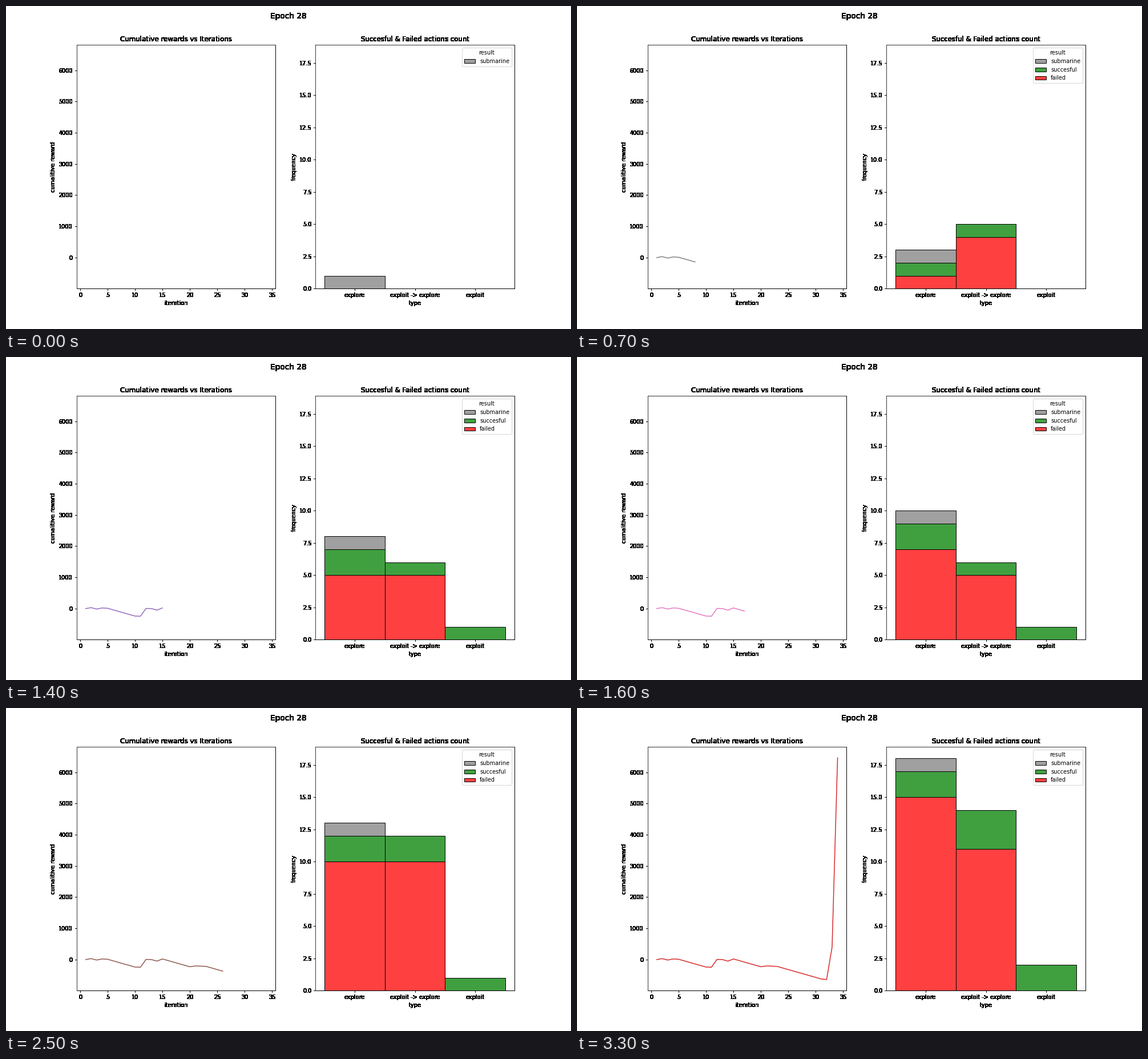
Write a matplotlib script that moves like this. It is 990 by 566 pixels and loops after 3.4 s.

```python
import matplotlib.pyplot as plt
import numpy as np
from matplotlib.animation import FuncAnimation
from matplotlib.colors import to_rgba
from matplotlib.patches import Patch

plt.rcParams["font.family"] = "DejaVu Sans"
W, H = 990, 566
DPI = W / 14
EPS = 1e-6  # guards the pixel size against float truncation

TYPES = ["explore", "exploit -> explore", "exploit"]
RESULTS = ["submarine", "succesful", "failed"]
COLORS = [to_rgba(c, 0.75) for c in ("gray", "green", "red")]

# Reward and action type (index into TYPES) of each iteration
gains = np.array([0, 30, -45, 35, -10] + [-50] * 5
                 + [-5, 250, -5, -50, 70] + [-50] * 5
                 + [25, -5, -10] + [-50] * 8 + [-20, 1040, 6065])
kinds = np.array([int(k) for k in "0001111110000020001110111000100012"])
outcomes = np.where(gains > 0, 1, 2)
outcomes[0] = 0
totals = np.cumsum(gains)
steps = np.arange(1, len(gains) + 1)


def solid(img, dpi):
    """Turn every touched pixel fully black."""
    out = np.zeros_like(img)
    out[..., 3] = img[..., 3] > 0
    return out, 0, 0


fig, (left, right) = plt.subplots(
    1, 2, figsize=((W + EPS) / DPI, (H + EPS) / DPI), dpi=DPI)
fig.subplots_adjust(left=0.125, right=0.9, bottom=0.125, top=0.88,
                    wspace=0.2005)
heading = fig.suptitle("Epoch 28", fontsize=14)

left.set(title="Cumulative rewards vs Iterations", xlabel="iteration",
         ylabel="cumalitive reward", xlim=(-0.65, 35.65), ylim=(-995, 6820),
         xticks=range(0, 36, 5), yticks=range(0, 6001, 1000))
right.set(title="Succesful & Failed actions count", xlabel="type",
          ylabel="frequency", xlim=(-0.65, 2.65), ylim=(0, 18.9),
          yticks=np.arange(0, 17.6, 2.5))
right.set_xticks(range(3), TYPES)

# Text and lines outside the plot area have hard edges
heading.set_agg_filter(solid)
for ax in (left, right):
    for part in (ax.title, ax.xaxis, ax.yaxis,
                 ax.spines["right"], ax.spines["bottom"]):
        part.set_agg_filter(solid)

line, = left.plot([], [], lw=1.5)
bars = [right.bar(range(3), 0, width=1, color=c, edgecolor="black", lw=1)
        for c in COLORS]
keys = [Patch(facecolor=c, edgecolor="black", lw=1, label=name)
        for c, name in zip(COLORS, RESULTS)]


def update(i):
    n = i + 1
    line.set_data(steps[:n], totals[:n])
    line.set_color(f"C{i % 10}")

    base = np.zeros(3)
    for r in reversed(range(3)):
        counts = np.bincount(kinds[:n][outcomes[:n] == r], minlength=3)
        for bar, y, h in zip(bars[r], base, counts):
            bar.set(y=y, height=h, visible=h > 0)
        base += counts

    shown = [keys[r] for r in range(3) if r in outcomes[:n]]
    right.legend(handles=shown, title="result", loc="upper right")


anim = FuncAnimation(fig, update, frames=len(gains), interval=100,
                     init_func=lambda: update(0), repeat=True, repeat_delay=0)
plt.show()
```
